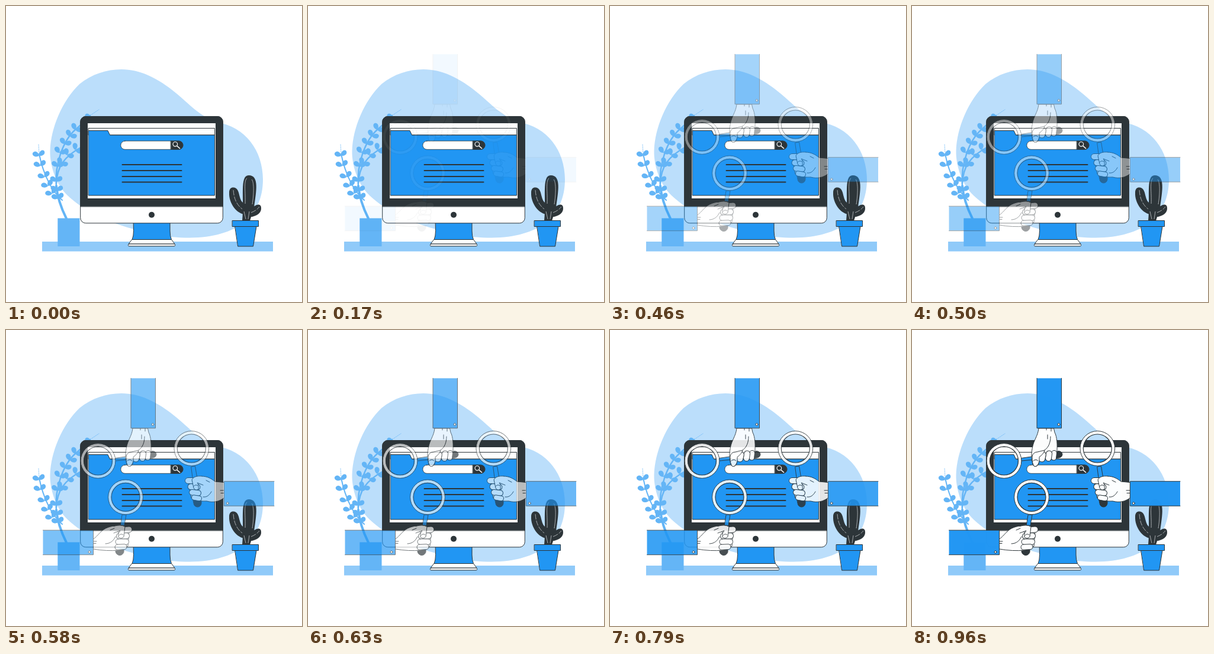
Animation of 500x500 px, one loop 1 s. Source, as an HTML page:

```html
<!DOCTYPE html>
<html lang="en">
<head>
<meta charset="utf-8">
<title>Search desk</title>
<style>
html, body { margin: 0; width: 100%; height: 100%; overflow: hidden; background: #fff; }
svg { display: block; width: 100vw; height: 100vh; }
.blue { fill: #2196f3; }
.dark { fill: #2d3539; }
.pale { fill: #64b5f6; }
.white { fill: #fff; }
.ink { stroke: #2d3539; stroke-linejoin: round; stroke-linecap: round; }
.line { fill: none; }
</style>
</head>
<body>
<svg viewBox="0 0 500 500">
  <defs>
    <g id="ring" class="line" stroke="#2d3539">
      <circle r="26.800" stroke="#fff" stroke-width="5.200"/>
      <circle r="29.400"/>
      <circle r="24" stroke-width="1.200"/>
    </g>
  </defs>

  <path fill="#bbdefb" d="M195 107C225 107 256 121 287 147C310 166 325 184 355 196C405 204 434 245 434 293C434 355 390 391 310 391.500C270 391.500 240 384 205 374C160 360 123 340 100 316C83 297 74 268 74.500 245C75.500 206 95 160 124 132C145 115 170 107 195 107Z"/>
  <path fill="#90caf9" d="M61 398H451V414.500H61Z"/>

  <g id="plant" class="pale">
    <path d="M87.300 358.500H124.500V406H87.300Z"/>
    <g class="line" stroke="#64b5f6" stroke-linecap="round">
      <path stroke-width="4" d="M102 359C94 343 87 325 85 304"/>
      <path stroke-width="2.500" d="M85 305C82 270 95 228 118 208S138 190 142 185"/>
      <path stroke-width="2.500" d="M85 300C86 272 98 254 128 238"/>
      <path stroke-width="2" d="M95 328C78 314 63 285 56 250"/>
      <path stroke-width=".7" stroke-dasharray="2 1.500" d="M56 250L55 234M142 185L157 175"/>
    </g>
  </g>

  <g class="ink">
    <path class="blue" d="M215.500 364H277V380Q277 389 279.500 394.500H213Q215.500 389 215.500 380Z"/>
    <path class="white" d="M213 394.500H279.500L285 402H207.500Z"/>
    <rect class="white" x="206.500" y="402" width="79" height="3.700" rx="1.200"/>
    <rect class="white" x="125.700" y="186.500" width="240.600" height="180.300" rx="9"/>
    <path class="dark" d="M125.700 338.500V195.500A9 9 0 0 1 134.700 186.500H357.300A9 9 0 0 1 366.300 195.500V338.500Z"/>
  </g>
  <path class="white" d="M138 198H354V325H138Z"/>
  <circle class="dark" cx="246" cy="352.700" r="5"/>
  <g class="ink">
    <path class="white" d="M139.500 206.500H352.500V218H139.500Z"/>
    <path class="blue" d="M139.500 210.500H172L175.500 218H352.500V320H139.500Z"/>
    <rect class="white" x="193.800" y="228" width="105.200" height="14.300" rx="7.150" stroke-width=".8"/>
    <path class="dark" d="M278.500 228H291.800A7.150 7.150 0 0 1 291.800 242.300H278.500Z" stroke-width=".8"/>
    <path class="line" stroke-width="2" d="M196.500 268H296.500M196.500 278H296.500M196.500 288H296.500M196.500 297.500H296.500"/>
  </g>
  <g class="line" stroke="#fff" stroke-linecap="round">
    <circle cx="285.800" cy="233.300" r="3.800" stroke-width="1.200"/>
    <path stroke-width="1.600" d="M289 236.500L293.500 240.500"/>
  </g>

  <g class="dark">
    <path d="M399 363C403 325 394 286 410 286C428 286 423 312 419 340L412 363Z"/>
    <path d="M384 306.500C396 307 392 325 400 332L406 352C391 353 376 334 377 315C377 309 380 306.500 384 306.500Z"/>
    <path d="M411 345C422 334 431 332 431 342C431 352 419 356 410 357Z"/>
  </g>
  <g class="line" stroke="#d8dcde" stroke-width=".7">
    <path d="M404 334C405 315 401 296 407 291M416 335C419 316 419 297 415 293"/>
    <path d="M384 311C385 326 390 336 399 343M414 349Q424 345 428 339" stroke-dasharray="9 2"/>
    <path d="M402 347L405 360M411 347L409 360"/>
  </g>
  <g class="blue ink">
    <path d="M387 372.500H423L417.500 406H392Z"/>
    <path d="M382.500 362.500H426.500V372.500H382.500Z"/>
  </g>

  <g id="hands" opacity="0">
    <g class="ink">
      <path class="blue" d="M184 216.500L212 212.500V218.500L185 221Z"/>
      <path class="dark" d="M240 207L247 204.500Q253 204.500 254 209.500Q254 215 248 216L241 217Z"/>
      <path class="white" d="M214 166H239.500L241 173C245 180 246 195 244.500 208L216 216L214 226C211 233 204 231 203.500 225C200 211 203 196 207 187C210 180 213 175 214 166Z"/>
      <rect class="white" x="235.500" y="203.500" width="8.500" height="16.500" rx="4.200" transform="rotate(6 240 212)"/>
      <rect class="white" x="226" y="204" width="10" height="17.500" rx="4.800" transform="rotate(8 231 213)"/>
      <rect class="white" x="214.500" y="205" width="11" height="17.500" rx="5" transform="rotate(12 219 214)"/>
      <path class="white" d="M203 213Q205 206 212 206L224 203Q222 210 215 214.500V222Q212 231 207 230.500Q202.500 227 203 213Z"/>
      <path class="line" d="M205 221Q209 217 213 221M227 166V169M235 166V171M234 180C234 190 231 198 224 203M229 177V184"/>
      <path class="blue" d="M211 81.500V165.800H252.500V81.500"/>
      <circle class="white" cx="248" cy="159.500" r="1.900"/>
    </g>
    <use href="#ring" x="155.500" y="221"/>

    <g class="ink">
      <path class="blue" d="M313 231L319.500 230L324 257H316.500Z"/>
      <path class="dark" d="M316 286H330V293Q329 299 323 299Q317.500 298 317 293Z"/>
      <path class="white" d="M368.500 257.500L353 256C347 251 340 247 330 247L320 249L308 258L313 284Q325 290 339 289C350 292 360 290 368.500 283.500Z"/>
      <rect class="white" x="302.500" y="249.500" width="20" height="10" rx="5"/>
      <rect class="white" x="307" y="260" width="21" height="10" rx="5" transform="rotate(3 317 265)"/>
      <rect class="white" x="309.500" y="270" width="20" height="9.500" rx="4.700" transform="rotate(6 319 275)"/>
      <rect class="white" x="313.500" y="279.500" width="17" height="8.500" rx="4.200" transform="rotate(9 322 284)"/>
      <path class="white" d="M331 247C323 246 316 248 314 253L317 267Q320 272 325 269Q326 261 323 258L333 262"/>
      <path class="line" d="M317 264Q320 260 324 263M333 282C340 283 344 278 347 273M338 254L344 257M368 271H362M368 275.500H363"/>
      <path class="blue" d="M453 255.700H368.300V297.200H453"/>
      <circle class="white" cx="374.300" cy="292.700" r="1.900"/>
    </g>
    <use href="#ring" x="313.300" y="200"/>

    <g class="ink">
      <path class="blue" d="M196.500 312H203L199 336H192.500Z"/>
      <path class="dark" d="M185.500 367H199V375Q197 381 191 380.500Q185.500 379 185 374Z"/>
      <path class="white" d="M147.500 353C153 350 158 342 165 337C174 331 186 330 198 330L208 340L206 365L191 372Q170 374 147.500 370Z"/>
      <rect class="white" x="188" y="332.500" width="25" height="10" rx="5" transform="rotate(-4 200 338)"/>
      <rect class="white" x="186.500" y="343" width="22" height="10" rx="5" transform="rotate(-2 197 348)"/>
      <rect class="white" x="185" y="353" width="22.500" height="9.500" rx="4.700"/>
      <rect class="white" x="184" y="362" width="20" height="9" rx="4.500" transform="rotate(-3 194 366)"/>
      <path class="white" d="M182 331.500Q193 328 201 332L199 349Q195 354 190 350Q189 343 193 339L182 343"/>
      <path class="line" d="M191 347Q194 343 198 346M168 361C177 361 182 355 185 349M176 338L183 335M148 357H153M148 360.500H152"/>
      <path class="blue" d="M62.500 338.200H147.500V379.700H62.500"/>
      <circle class="white" cx="141" cy="375" r="1.900"/>
    </g>
    <use href="#ring" x="202" y="282.300"/>
  </g>
</svg>
<script>
const plant = document.getElementById("plant");
const hands = document.getElementById("hands");

function leaf(x, y, angle) {
  const path = document.createElementNS("http://www.w3.org/2000/svg", "path");
  path.setAttribute("d", "M0 0C3 -6 11 -6 11.800 -1.500C11.800 4 5 5.500 0 0Z");
  path.setAttribute("transform", `translate(${x} ${y}) rotate(${angle})`);
  plant.append(path);
}

// Leaf pairs: x, y and heading of the stem in degrees
const nodes = [
  [56, 253, -95], [58, 270, -97], [65, 289, -102], [71, 304, -108], [78, 317, -112],
  [88, 325, -95], [86, 312, -85], [85, 296, -85], [87, 271, -78], [90, 248, -62],
  [99, 233, -62], [108, 220, -52], [117, 209, -50],
  [93, 267, -50], [103, 252, -40], [117, 243, -33]
];
for (const [x, y, dir] of nodes) {
  leaf(x, y, dir - 55);
  leaf(x, y, dir + 55);
}
leaf(140, 193, -105);

function draw(now) {
  const t = Math.max(0, now % 1000 / 1000 - .02);
  hands.setAttribute("opacity", (1 - Math.cos(Math.PI * t)) / 2);
  requestAnimationFrame(draw);
}
requestAnimationFrame(draw);
</script>
</body>
</html>
```
